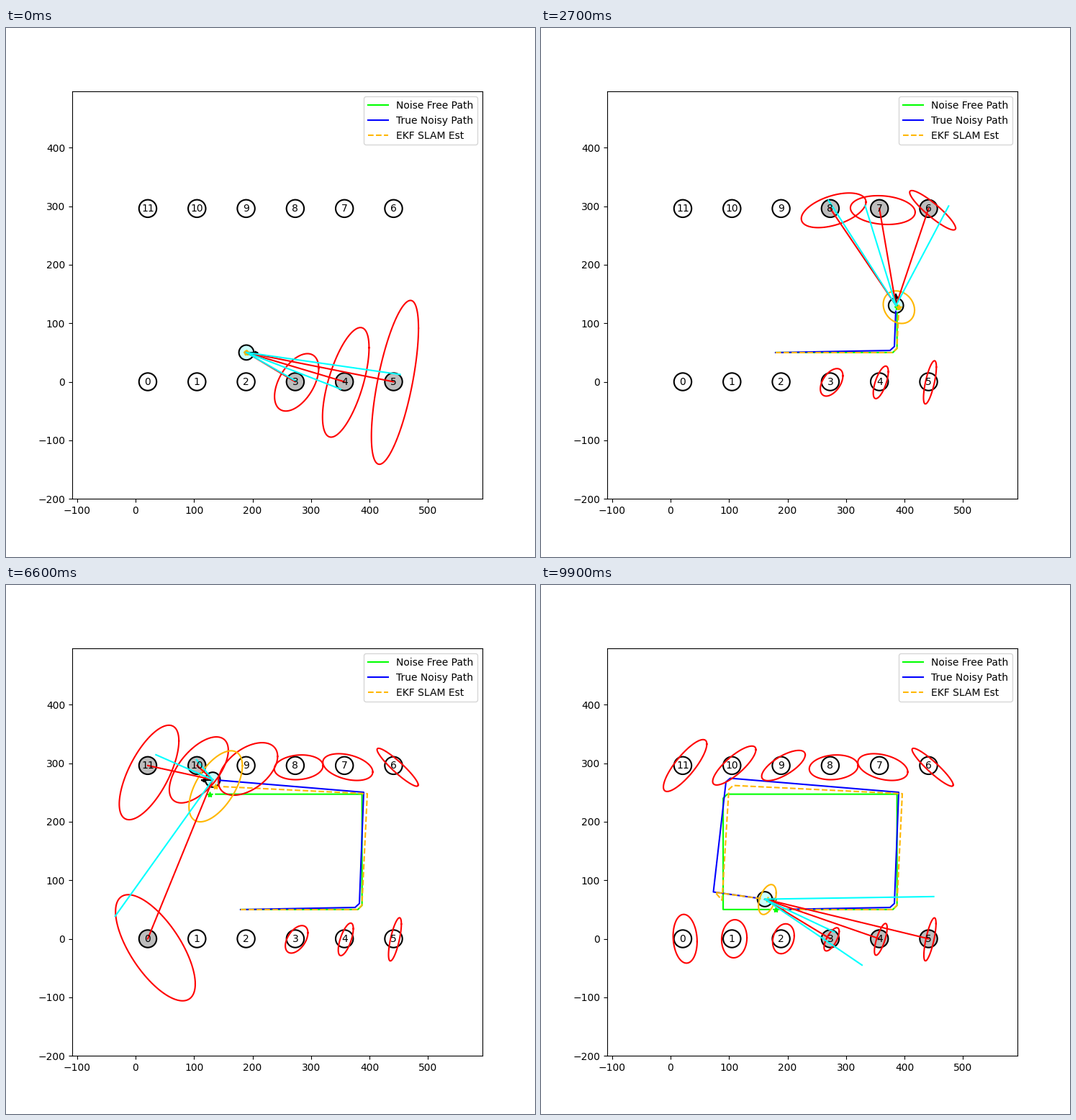
Animation, 735 px wide and 735 px high, one loop 10000 ms. Source, as a matplotlib script:

```python
import matplotlib.pyplot as plt
import numpy as np
from matplotlib.animation import FuncAnimation
from matplotlib.patches import Circle

SIZE, FRAMES = 735, 100
SCALE = 0.77 * SIZE / 696                     # pixels per data unit
ORIGIN = np.array([0.5125 * SIZE - 242 * SCALE, 0.89 * SIZE - 200 * SCALE])
ORANGE = '#ffb700'
CLOSURE = 90                                  # step that closes the loop
ANCHOR = np.array([357, 0])                   # middle of the first landmarks
RANGE_SD, BEARING_SD = 29.5, 0.54             # drawn size of sensor noise
PASSED, FOV = np.radians(45), np.radians(70)

xs = 21 + 84 * np.arange(6)
MARKS = np.array([(x, 0) for x in xs] + [(x, 296) for x in xs[::-1]])


# Every path is straight between the same turning steps.
TURNS = [-1, 19, 20, 39, 40, 69, 70, 89, 90, 99]


def walk(corners):
    steps = np.arange(-1, FRAMES)
    return np.stack([np.interp(steps, TURNS, c) for c in zip(*corners)], -1)


def walk_px(corners):
    """Path through corners given in stage pixels."""
    return (walk(corners) - ORIGIN) * [1, -1] / SCALE


D = 10 / np.sqrt(2)
EAST, NORTH = 380 + D, 240 + D
ideal = walk([(180, 50), (380, 50), (EAST, 50 + D), (EAST, NORTH),
              (EAST, NORTH), (90 + D, NORTH), (90, 240), (90, 50),
              (90, 50), (180, 50)])
noisy = walk_px([(326, 451), (485, 448), (491, 442.5), (497, 288),
                 (497, 288), (263, 268.5), (257, 273.5), (239.5, 426.5),
                 (239.5, 426.5), (311, 436.5)])
guess = walk_px([(326, 451), (489, 451), (494.5, 445), (502, 290),
                 (502, 290), (267, 278.5), (261, 284), (251.5, 438),
                 (242, 427), (314.5, 437)])


def heading(f):
    d = ideal[f + 1] - ideal[f]
    if not d.any():
        d = ideal[f + 2] - ideal[f + 1]
    return np.arctan2(d[1], d[0])


def bearing(k, f):
    d = MARKS[k] - noisy[f + 1]
    a = np.arctan2(d[1], d[0]) - heading(f)
    return abs((a + np.pi) % (2 * np.pi) - np.pi)


def observe():
    """Landmarks in view and gathered information at every step."""
    views, infos, seen = [], [], {}
    info = np.zeros((len(MARKS), 2, 2))
    first = 0
    for f in range(FRAMES):
        while bearing(first, f) > PASSED:
            first = (first + 1) % len(MARKS)
        ids = [(first + i) % len(MARKS) for i in range(3)]
        ids = [k for k in ids if bearing(k, f) < FOV]
        for k in ids:
            seen.setdefault(k, f)
            d = MARKS[k] - noisy[f + 1]
            r = np.hypot(*d)
            u, v = d / r, np.array([-d[1], d[0]]) / r
            info[k] += np.outer(u, u) / RANGE_SD ** 2
            info[k] += np.outer(v, v) / (BEARING_SD * r) ** 2
        views.append(ids)
        infos.append(info.copy())
    return views, infos, seen


views, infos, first_seen = observe()


def swing(s):
    return 0.13 + 0.2 * min(1, s / 70) ** 2


def pose_error(p, s, closed):
    """Covariance at p from the drift up to step s, swinging about a pivot."""
    if closed:
        pivot, turn, drift = ANCHOR, 0.115, 13
    else:
        pivot, turn, drift = ideal[:s + 2].mean(0), swing(s), 3 + min(0.8 * s, 30)
    r = p - pivot
    v = turn * np.array([-r[1], r[0]])
    return drift ** 2 * np.eye(2) + np.outer(v, v)


def mark_center(k, s, closed):
    if closed:
        return MARKS[k] + [4, 0]
    r = MARKS[k] - ideal[:s + 2].mean(0)
    tilt = 0.3 * (swing(s) - swing(0))
    shift = np.array([7, -3]) * min(1, (s + 2) / 6)
    return MARKS[k] + shift + tilt * np.array([-r[1], r[0]])


T = np.linspace(0, 2 * np.pi, 121)


def ellipse(center, cov):
    return center[:, None] + np.linalg.cholesky(cov) @ [np.cos(T), np.sin(T)]


def mark_ellipse(k, f):
    s = first_seen.get(k, FRAMES)
    if f < s:
        return [], []
    closed = f >= CLOSURE and s > 30
    cov = np.linalg.inv(infos[f][k]) + pose_error(MARKS[k], s, closed)
    return ellipse(mark_center(k, s, closed), cov)


def measured(f, pos, ids):
    rng = np.random.default_rng(f)
    d = MARKS[ids] - pos
    r = np.hypot(*d.T) + rng.normal(0, 14, len(d))
    a = np.arctan2(d[:, 1], d[:, 0]) + rng.normal(0, 0.15, len(d))
    return pos + np.c_[r * np.cos(a), r * np.sin(a)]


fig, ax = plt.subplots(figsize=(SIZE / 100, SIZE / 100), dpi=100)
fig.subplots_adjust(left=0.125, right=0.9, bottom=0.11, top=0.88)
half = 0.775 * SIZE / SCALE / 2
ax.set_xlim(242 - half, 242 + half)
ax.set_ylim(-200, 496)


def line(color, **kw):
    return ax.plot([], [], color=color, **kw)[0]


paths = [(line('lime', label='Noise Free Path'), ideal),
         (line('blue', label='True Noisy Path'), noisy),
         (line(ORANGE, ls='--', label='EKF SLAM Est'), guess)]
ax.legend(loc='upper right')

discs = []
for k, p in enumerate(MARKS):
    discs.append(ax.add_patch(Circle(p, 15, fc='white', ec='black', lw=1.5)))
    ax.text(*p, str(k), ha='center', va='center')
robot = ax.add_patch(Circle((0, 0), 12.7, fc='#ccffff', ec='black', lw=1.5))

arrow = line('black')
tip = line('black', ms=4, ls='')
ideal_star = line('lime', marker='*', ms=6, ls='')
guess_star = line(ORANGE, marker='*', ms=6, ls='')
rings = [line('red') for _ in MARKS]
pose_ring = line(ORANGE)
sight = [line('red') for _ in range(3)]
rays = [line('cyan') for _ in range(3)]


def fan(lines, pos, ends):
    for i, ln in enumerate(lines):
        seg = np.array([pos, ends[i]]) if i < len(ends) else np.empty((0, 2))
        ln.set_data(*seg.T)


def update(f):
    pos, est, ids = noisy[f + 1], guess[f + 1], views[f]
    for ln, pts in paths:
        ln.set_data(*pts[:f + 1].T)
    for k, disc in enumerate(discs):
        disc.set_facecolor('0.74' if k in ids else 'white')
        rings[k].set_data(*mark_ellipse(k, f))

    robot.center = pos
    a = heading(f)
    d = np.array([np.cos(a), np.sin(a)])
    arrow.set_data(*np.array([pos, pos + 19 * d]).T)
    tip.set_data(*(pos + 16 * d)[:, None])
    tip.set_marker((3, 0, np.degrees(a) - 90))
    ideal_star.set_data(*ideal[f + 1][:, None])
    guess_star.set_data(*est[:, None])
    pose_ring.set_data(*ellipse(est, pose_error(est, f, f >= CLOSURE)))
    fan(sight, pos, MARKS[ids])
    fan(rays, pos, measured(f, pos, ids))
    return []


anim = FuncAnimation(fig, update, frames=FRAMES, interval=100,
                     init_func=lambda: update(0), repeat=True, repeat_delay=0)
plt.show()
```
